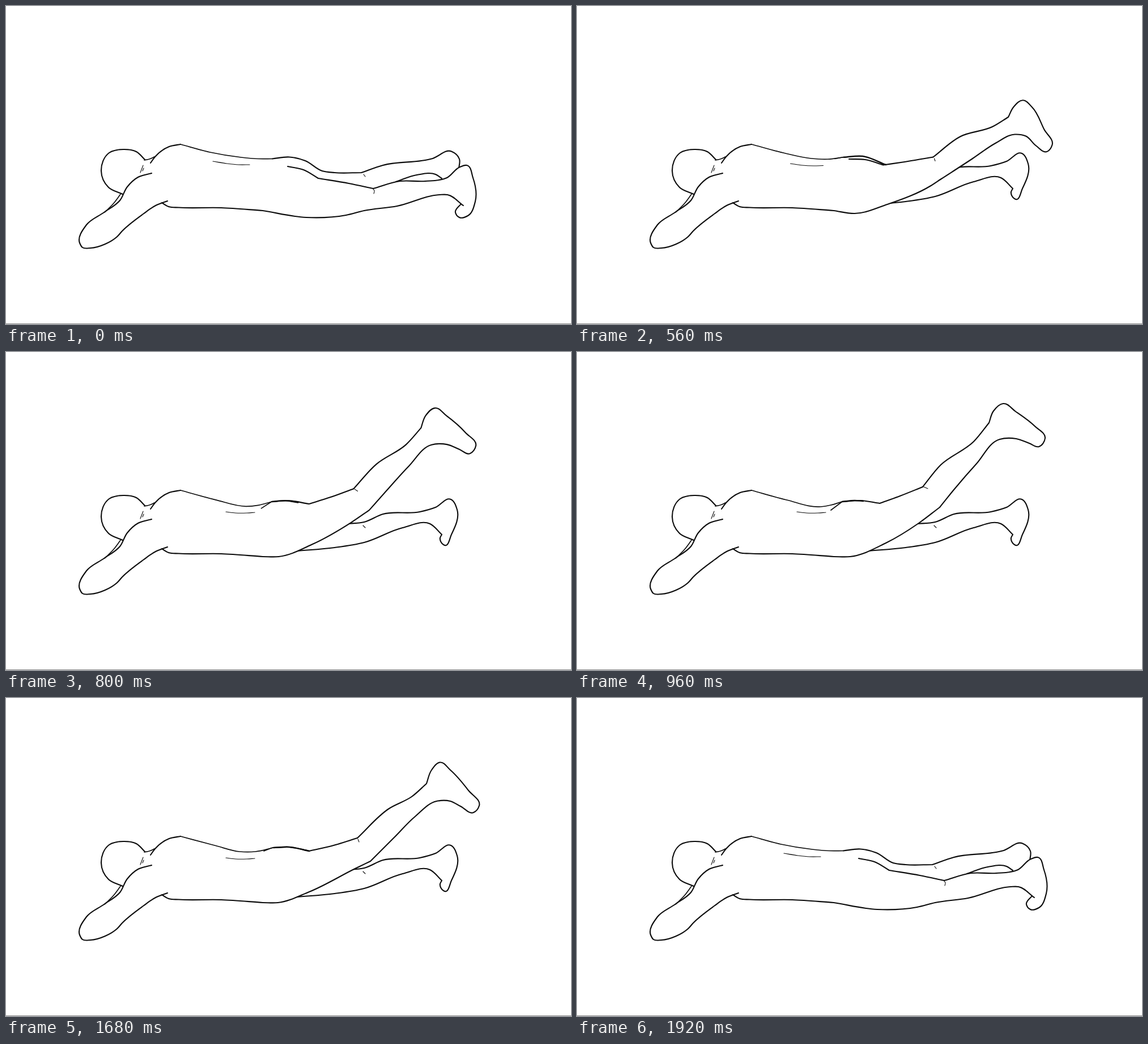
These frames come from a looping animation (997 px wide and 561 px high, 2400 ms). An HTML page:

```html
<!DOCTYPE html>
<html lang="en">
<head>
<meta charset="utf-8">
<title>Prone leg raise</title>
<style>
  html, body { margin: 0; width: 100%; height: 100%; overflow: hidden; background: #fff; }
  svg { display: block; width: 100%; height: 100%; }
  path { fill: none; stroke: #0c0c0c; stroke-width: 2.1; stroke-linecap: round; stroke-linejoin: round; }
  .leg { fill: #fff; }
  .hip { stroke-width: 2.5; }
  .back, .neck, .crease, .chest { stroke-width: 1.7; }
  .spine, .knee, .tick, .nape { stroke-width: 1.1; }
  .floor { stroke: #8a8a8a; stroke-width: 1; }
</style>
</head>
<body>
<svg viewBox="0 0 997 561">
  <g id="figure"></g>
  <path class="floor" d="M0 560.5H997"/>
</svg>
<script>
const parse = s => s.split(' ').map(p => p.split(',').map(Number));
const dist = (p, q) => Math.hypot(q[0] - p[0], q[1] - p[1]);

// Unit tangent at b, leaning towards its nearer neighbour.
function tangent(a, b, c) {
  const u = dist(a, b) || 1, v = dist(b, c) || 1;
  const t = b.map((x, k) => (x - a[k]) * v / u + (c[k] - x) * u / v);
  const n = Math.hypot(...t) || 1;
  return t.map(x => x / n);
}

// Smooth curve through the points; a doubled point makes a corner.
function curve(pts) {
  let d = 'M' + pts[0];
  for (let i = 1; i < pts.length; i++) {
    const b = pts[i - 1], c = pts[i], len = dist(b, c);
    if (!len) continue;
    const t1 = tangent(pts[i - 2] || b, b, c);
    const t2 = tangent(b, c, pts[i + 1] || c);
    d += `C${b.map((x, k) => x + t1[k] * len / 3)} ${c.map((x, k) => x - t2[k] * len / 3)} ${c}`;
  }
  return d;
}

const shape = parts =>
  Object.fromEntries(Object.entries(parts).map(([name, s]) => [name, parse(s)]));
const draw = parts => Object.entries(parts)
  .map(([name, pts]) => `<path class="${name}" d="${curve(pts)}"/>`).join('');

const body = shape({
  head: '245,271 230,257 207,253 182,259 168,291 181,320 206,332',
  neck: '244,272 253,270 262,266',
  shoulder: '255,277 263,266 288,248 308,244',
  nape: '242,281 237,294',
  tick: '243,286 241,291',
  arm: '257,295 233,302 214,319 201,343 173,364 142,386 130,418 135,426 149,427 175,420 196,407 205,397 242,367 264,352 285,344',
  chest: '202,332 190,348 174,364',
  belly: '275,347 287,354 305,355.5 380,356 453,361'
});

const flat = {
  back: '308,244 360,258 415,267 445,269.5 470,269.5',
  spine: '365,274 390,278 410,280 430,280'
};

// Raised poses share one layout of points, so they can be blended.
const raised = parts => shape({
  far: '600,303 632,300 665,286 730,282 758,274 785,260 796,278 786,322 774,341 766,328 769,322 769,322 748,303 700,310 632,336 580,345 512,351',
  knee: '630,306 634,310',
  spine: '388,282 405,284 425,284 439,283',
  ...parts
});

const poses = [
  shape({
    far: '470,269.5 500,266.5 528,273 558,291 580,294 627,294 627,294 665,281 753,269 786,256.5 800,270 799,287',
    gap: '688,310 725,298 758,297 769,304',
    leg: '648,322 695,309 740,309 778,303 801,284 813,281 824,303 828,345 815,370 800,373 793,364 803,349',
    calf: '453,361 530,373 600,369 632,361 690,353 765,333 779,333 807,352',
    thigh: '497,283 525,289 551,304 551,304 605,313 648,322',
    knee: '631,297 634,301',
    tick: '648,323 650,326 649,331',
    ...flat
  }),
  raised({
    leg: '637,286 678,265 750,252 780,241 780,241 790,229 808,219 822,230 833,273 842,300 833,312 818,302 800,277 785,271 755,275 710,293 641,323 641,323 631,334 560,358 500,371 453,361',
    thigh: '488,276 517,279 546,291 546,291 590,288 637,286',
    hip: '470,269.5 508,267 555,290',
    crease: '455,269 470,269',
    tick: '640,289 641,293',
    ...flat
  }),
  raised({
    leg: '620,247 676,195 716,174 742,151 742,151 751,127 766,113.5 784,127 816,163 835,190 825,202 802,191 784,182 760,182 722,209 685,246 643,288 643,288 618,300 535,342 480,361 453,361',
    thigh: '472,264 500,263 535,270 535,270 578,260 620,247',
    hip: '472,264 500,263 535,270',
    back: '308,244 370,260.5 412,271 440,271 472,264',
    crease: '455,270 470,264',
    tick: '621,249 623,254'
  }),
  raised({
    leg: '610,238 642,199 700,158 727,125 727,125 735,104 752,91 774,105 808,131 826,152 815,167 798,161 775,153 746,154 705,197 665,243 640,274 640,274 603,302 545,337 482,361 453,361',
    thigh: '468,264 500,262 534,267 534,267 570,254 610,238',
    hip: '468,264 490,262 505,263',
    back: '308,244 370,261 430,273 448,270 468,264',
    crease: '448,279 468,264',
    tick: '612,238 619,241'
  })
];

// A lift of 2.6 lies six tenths of the way from pose 2 to pose 3.
function pose(lift) {
  const low = poses[Math.floor(lift)], high = poses[Math.ceil(lift)], t = lift % 1;
  const parts = {};
  for (const name in low)
    parts[name] = low[name].map((p, i) => p.map((x, k) => t ? x + (high[name][i][k] - x) * t : x));
  return parts;
}

const steps = [
  [0, 0], [480, 1], [560, 1.5], [640, 2], [800, 2.65],
  [960, 3], [1520, 2.65], [1680, 2], [1760, 1], [1920, 0]
];
const figure = document.getElementById('figure');
let shown;

function tick() {
  const now = performance.now() % 2400;
  const lift = steps.findLast(([start]) => start <= now)[1];
  if (lift !== shown) figure.innerHTML = draw(pose(shown = lift)) + draw(body);
  requestAnimationFrame(tick);
}
tick();
</script>
</body>
</html>
```
